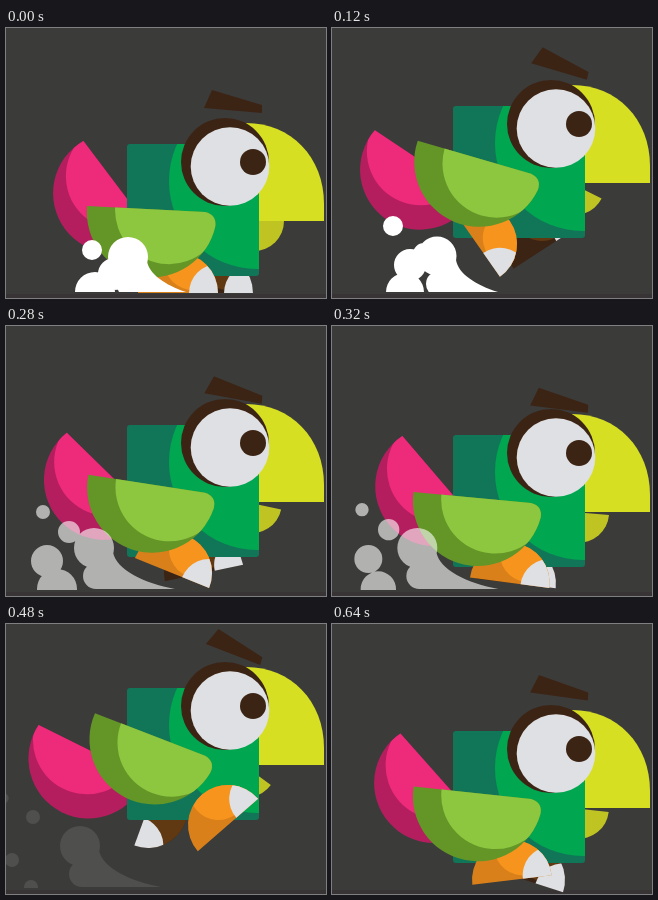
Animation, 320 px wide and 270 px high, one loop 0.68 s. Source, as an HTML page with a canvas:

```html
<!DOCTYPE html>
<html lang="en">
<head>
<meta charset="utf-8">
<title>Running bird</title>
<style>
html, body { margin: 0; width: 100%; height: 100%; overflow: hidden; background: #3b3b3a; }
canvas { display: block; width: 320px; height: 270px; }
</style>
</head>
<body>
<canvas id="stage" width="320" height="270"></canvas>
<script>
const ctx = document.getElementById('stage').getContext('2d');
const LOOP = 680, STEP = 40, FLOOR = 264, LOW = 116;
const RAD = Math.PI / 180;

// Top of the body at every step
const BOUNCE = [116, 107, 92, 78, 71, 74, 85, 99, 109, 106, 93, 77, 64, 65, 79, 95, 107];
const SMOKE_ALPHA = [1, 1, 1, 1, 1, .6, .6, .6, .6, .3, .3, .1, .1, .1];

const KEYS = [0, 120, 200, 280, 400, 480, 640];
const NEAR = {
  x: [172, 145, 144, 166, 201, 222, 180],
  y: [149, 138, 136, 148, 143, 137, 149],
  turn: [0, 55, 60, 22, -18, -41, -7],
  dark: '#d9801a', light: '#f7941e'
};
const FAR = {
  x: [207, 215, 215, 198, 155, 142, 193],
  y: [149, 141, 141, 148, 144, 120, 149],
  turn: [0, -33, -34, -12, 52, 110, 18],
  dark: '#3c2415', light: '#603913'
};
const BROW_Y = [0, -1, 0, 7, 6, 0, -1];

// Each puff: [time, x, y, radius]
const PUFFS = [
  [[0, 86, 222, 10], [120, 61, 198, 10], [200, 44, 186, 7], [280, 37, 186, 7], [400, 16, 179, 6], [520, -12, 172, 5]],
  [[0, 112, 236, 11], [120, 92, 226, 11], [200, 70, 206, 11], [280, 63, 206, 11], [400, 44, 199, 10], [480, 27, 193, 7], [560, 10, 188, 4]],
  [[0, 108, 246, 16], [120, 78, 237, 16], [200, 48, 235, 16], [280, 41, 235, 16], [400, 27, 229, 10], [480, 6, 236, 7], [560, -14, 240, 4]],
  [[0, 89, 264, 20], [120, 73, 264, 19], [200, 58, 263, 20], [280, 51, 263, 20], [400, 37, 263, 13], [480, 25, 263, 7], [560, 14, 263, 2]]
];
const PLUME = [[0, 122, 229, 20], [120, 105, 228, 19.5], [200, 95, 222, 20], [280, 88, 222, 20], [400, 80, 222, 20], [480, 74, 222, 20], [560, 67, 222, 20]];

const WING = new Path2D('M0 0H118Q130 2 129 14A65 65 0 0 1 0 0Z');
const TAIL = new Path2D('M0 0H119A60 60 0 1 1 0 0Z');
const LEG = new Path2D('M-40 0A40 40 0 0 1 40 0Z');
const BROW = new Path2D('M-21 -20.5L29 -5.5V2.5L-29 -2.5Z');
const JAW = new Path2D('M-23 10H37A30 30 0 0 1 -23 10Z');
const BEAK = new Path2D('M240 -21C285 -21 318 13 318 60V77H240Z');
const BODY = new Path2D();
BODY.roundRect(121, 0, 132, 132, 3);

// Smooth periodic curve through the key values
function curve(values, t) {
  const n = KEYS.length;
  const at = i => KEYS[(i + n) % n] + LOOP * Math.floor(i / n);
  const val = i => values[(i + n) % n];
  const slope = i => (val(i + 1) - val(i - 1)) / (at(i + 1) - at(i - 1));
  let i = n - 1;
  while (KEYS[i] > t) i--;
  const d = at(i + 1) - at(i), u = (t - at(i)) / d, v = 1 - u;
  return v * v * (1 + 2 * u) * val(i) + u * u * (3 - 2 * u) * val(i + 1)
    + d * u * v * (v * slope(i) - u * slope(i + 1));
}

function track(keys, t) {
  let i = 0;
  while (i < keys.length - 2 && keys[i + 1][0] <= t) i++;
  const a = keys[i], b = keys[i + 1];
  const u = Math.min(1, (t - a[0]) / (b[0] - a[0]));
  return a.slice(1).map((p, k) => p + (b[k + 1] - p) * u);
}

function at(x, y, turn, draw) {
  ctx.save();
  ctx.translate(x, y);
  ctx.rotate(turn * RAD);
  draw();
  ctx.restore();
}

function fill(path, color) {
  ctx.fillStyle = color;
  ctx.fill(path);
}

function disc(x, y, r, color) {
  ctx.fillStyle = color;
  ctx.beginPath();
  ctx.arc(x, y, r, 0, 7);
  ctx.fill();
}

// Shape in a base colour with discs kept inside its outline
function shaded(path, base, ...discs) {
  fill(path, base);
  ctx.save();
  ctx.clip(path);
  discs.forEach(d => disc(...d));
  ctx.restore();
}

function leg(limb, t, top) {
  at(curve(limb.x, t), top + curve(limb.y, t), curve(limb.turn, t), () =>
    shaded(LEG, limb.dark, [15, -32, 29, limb.light], [40, 0, 29, '#dfe0e3']));
}

function smoke(t) {
  const alpha = SMOKE_ALPHA[t / STEP] || 0;
  if (!alpha) return;
  const [x, y, r] = track(PLUME, t);
  ctx.save();
  ctx.beginPath();
  ctx.rect(0, 0, 320, FLOOR);
  ctx.clip();
  ctx.globalAlpha = alpha;
  ctx.fillStyle = '#fff';
  ctx.beginPath();
  const add = (cx, cy, cr) => {
    ctx.moveTo(cx + cr, cy);
    ctx.arc(cx, cy, cr, 0, 2 * Math.PI);
  };
  PUFFS.forEach(p => add(...track(p, t)));
  add(x, y, r);
  add(x + 2, y + 28, 13);
  ctx.moveTo(x + 19, y + 4);
  ctx.bezierCurveTo(x + 22, y + 22, x + 50, y + 35, x + 81, y + 41);
  ctx.lineTo(x + 2, y + 41);
  ctx.lineTo(x + 4, y + 14);
  ctx.closePath();
  ctx.fill();
  ctx.restore();
}

function draw(t) {
  const top = BOUNCE[t / STEP], lift = LOW - top;

  ctx.fillStyle = '#3b3b3a';
  ctx.fillRect(0, 0, 320, 270);
  ctx.fillStyle = '#383334';
  ctx.fillRect(0, 266, 320, 4);

  leg(FAR, t, top);
  at(140, top + 112, -.51 * lift, () => at(-62.6, -115, 53, () =>
    shaded(TAIL, '#b41e5e', [50, -8, 54, '#ee2a7b'])));
  at(241, top + 67, .7 * lift, () => fill(JAW, '#bfc423'));

  at(0, top, 0, () => {
    fill(BEAK, '#d7df23');
    shaded(BODY, '#117658', [251, 37, 88, '#00a750']);
  });

  leg(NEAR, t, top);
  at(200, top + 68, 2.9 + .35 * lift, () => {
    ctx.translate(-119, 0);
    shaded(WING, '#639527', [82, 0, 54, '#8dc63f']);
  });

  at(0, top, 0, () => {
    disc(219, 18, 44, '#3c2415');
    disc(224, 22.5, 39.3, '#dfe0e3');
    disc(247, 18, 13, '#3c2415');
  });
  at(227, top - 33.5 + curve(BROW_Y, t), .31 * lift, () => fill(BROW, '#3c2415'));
  smoke(t);
}

function tick() {
  draw(Math.floor(performance.now() % LOOP / STEP) * STEP);
  requestAnimationFrame(tick);
}
tick();
</script>
</body>
</html>
```
